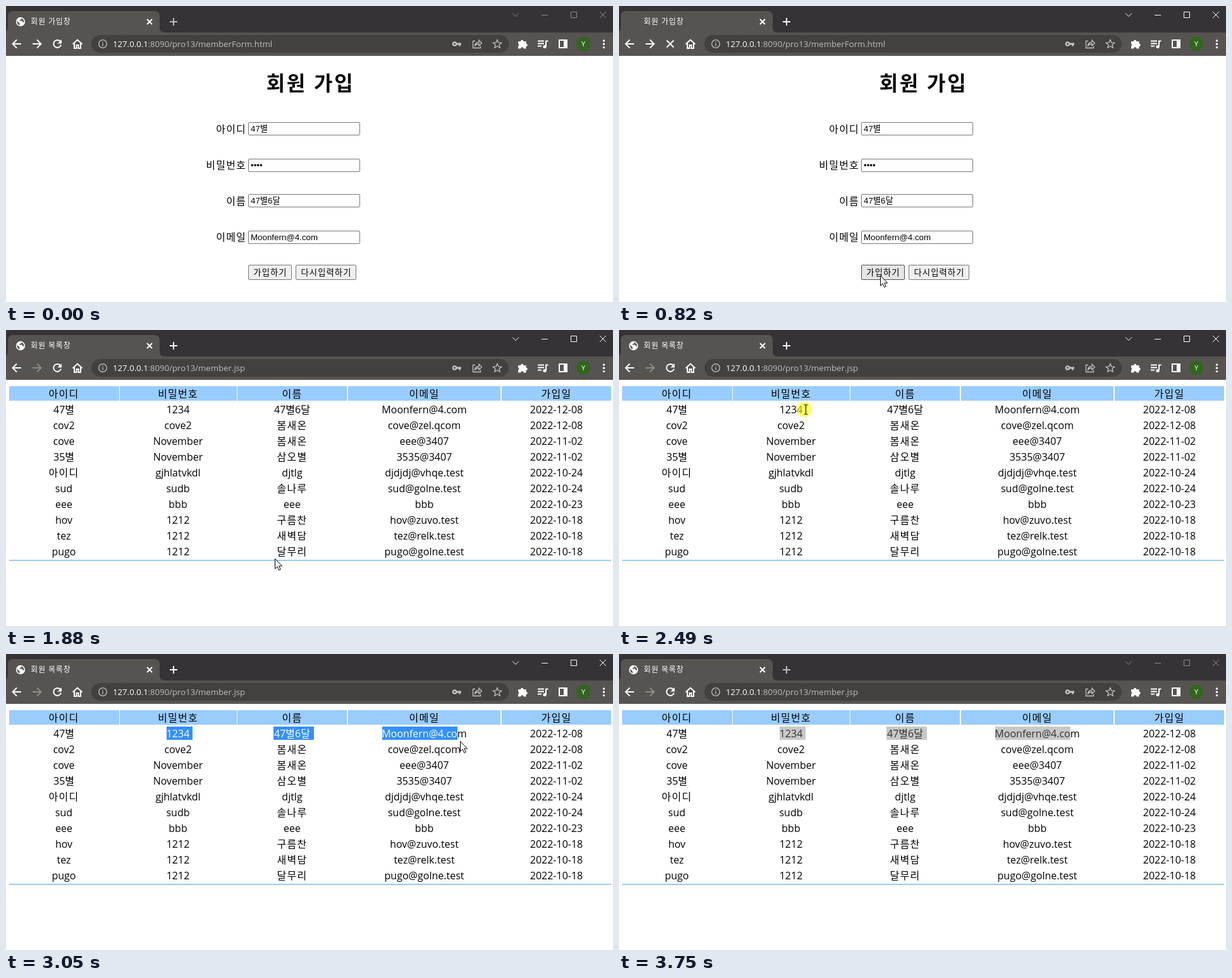
An HTML page that plays this animation: 960x469 px, repeating every 3.95 s.

```html
<!DOCTYPE html>
<html lang="ko">
<head>
<meta charset="utf-8">
<title>회원 가입창</title>
<style>
html, body { margin: 0; width: 100%; height: 100%; overflow: hidden; background: #fff; }
svg { display: block; width: 960px; height: 469px; }
text { font-family: "Open Sans", "Noto Sans CJK KR", "Noto Sans CJK", sans-serif; font-size: 16px; white-space: pre; }
.field { font-family: "Liberation Sans", "Noto Sans CJK KR", "Noto Sans CJK", sans-serif; font-size: 13.33px; }
.mid { text-anchor: middle; }
.end { text-anchor: end; }
.ko { letter-spacing: 1.2px; }
.small { font-size: 13.33px; letter-spacing: 1.1px; }
.tab { font-size: 12px; letter-spacing: .9px; }
.url { font-size: 13.2px; }
.line { fill: none; stroke: #fff; stroke-width: 2; }
.soft { fill: none; stroke: #c4c1bf; stroke-width: 1.3; }
.thin { fill: none; stroke: #fff; stroke-width: 1; }
.away .thin { stroke: #8e8c8c; }
.away .plus { stroke: #c0bebd; }
</style>
</head>
<body>
<svg id="stage" viewBox="0 0 960 469" xmlns="http://www.w3.org/2000/svg">
  <defs><clipPath id="clip"><rect id="reach" x="254" y="115" width="0" height="21"/></clipPath></defs>
  <rect width="960" height="469" fill="#fff"/>

  <g id="chrome">
    <rect width="960" height="42" fill="#353335"/>
    <path d="M-5 42Q3 42 3 34V16Q3 8 11 8H235Q243 8 243 16V34Q243 42 251 42Z" fill="#575351"/>
    <rect y="42" width="960" height="37" fill="#575351"/>
    <rect x="135" y="46" width="660" height="28" rx="14" fill="#43403f"/>

    <g id="globe">
      <circle cx="23" cy="25" r="7.2" fill="#fff"/>
      <path d="M17.5 23.5L21.5 27.5V30.5Q17 29 17.5 23.5ZM24 19.5Q29 21 28.5 26L26.5 25.5L25.5 23.5H21.5V22L24 21.5Z" fill="#575351"/>
    </g>
    <path class="line" stroke-width="1.6" d="M223 21L231 29M231 21L223 29"/>
    <path class="line plus" d="M259 25H271M265 19V31"/>
    <path class="thin" d="M801 11.5L806 16.5L811 11.5M847 14.5H857M893.5 9.5H902.5V18.5H893.5ZM939 9L949 19M949 9L939 19"/>

    <path class="line" d="M24 60H11M17 53.5L10.5 60L17 66.5"/>
    <path class="line" id="forward" d="M42 60H55M49 53.5L55.5 60L49 66.5"/>
    <g id="reload">
      <path class="line" d="M85.8 56A6 6 0 1 0 87 61.5"/>
      <path d="M88 53V59.5H81.5Z" fill="#fff"/>
    </g>
    <path class="line" id="stop" d="M75.5 54.5L86.5 65.5M86.5 54.5L75.5 65.5"/>
    <path class="line" d="M105.5 60.5L113 53.5L120.5 60.5M108 59V67H111.5V62H114.5V67H118V59"/>

    <g class="soft">
      <circle cx="153" cy="60" r="6.3"/>
      <path d="M153 59V63.5M153 56.3V57.8"/>
      <circle cx="709.5" cy="60" r="2.6" stroke-width="2.4"/>
      <path d="M713 60H720M717.5 60V63.5" stroke-width="2.8"/>
      <path d="M742 55.5H738.5V66.5H750.5V63.5M741.5 63Q742 57.5 748 57.5V54L752.5 58.7L748 63V60Q744 60 741.5 63Z"/>
      <path d="M777 53.5L778.9 58L783.7 58.4L780 61.5L781.2 66.2L777 63.7L772.8 66.2L774 61.5L770.3 58.4L775.1 58Z"/>
    </g>

    <path d="M810 56H814A2.2 2.2 0 1 1 818.4 56H822.5V59.5A2.2 2.2 0 1 1 822.5 64V67.5H818.5A2.2 2.2 0 0 0 814 67.5H810V63.5A2.2 2.2 0 0 0 810 59.5Z" fill="#fff"/>
    <path class="line" d="M841 55.5H851M841 59.5H851M841 63.5H847M854 64.5V55.5H857.5"/>
    <circle cx="852" cy="64.5" r="2.6" fill="#fff"/>
    <path class="line" d="M875 54H887V66H875Z"/>
    <rect x="882" y="54" width="5" height="12" fill="#fff"/>
    <circle cx="913" cy="60" r="11.2" fill="#31661f"/>
    <g fill="#fff"><circle cx="945.5" cy="55" r="1.7"/><circle cx="945.5" cy="60.3" r="1.7"/><circle cx="945.5" cy="65.6" r="1.7"/></g>
  </g>

  <g id="form"></g>
  <g id="list"></g>
  <g id="picked" clip-path="url(#clip)"></g>

  <circle id="press" r="12" fill="#ffff00" opacity=".6"/>
  <path id="arrow" d="M.5 .5V16.3L4.1 12.9L6.6 18.6L9.2 17.5L6.8 11.9H11.6Z" fill="#fff" stroke="#000"/>
  <path id="beam" d="M-3 -7.5H-1L0 -6.5L1 -7.5H3M0 -6.5V6.5M-3 7.5H-1L0 6.5L1 7.5H3" fill="none" stroke="#222" stroke-width="1.2"/>
</svg>

<script>
const LOOP = 3950;
const $ = id => document.getElementById(id);

function add(parent, tag, attrs, content = '') {
  const el = document.createElementNS('http://www.w3.org/2000/svg', tag);
  for (const key in attrs) el.setAttribute(key, attrs[key]);
  el.textContent = content;
  parent.append(el);
  return el;
}
const label = (parent, x, y, content, cls = '', fill = '#000') =>
  add(parent, 'text', { x, y, class: cls, fill }, content);
const box = (parent, x, y, width, height, fill, more = {}) =>
  add(parent, 'rect', { x, y, width, height, fill, ...more });
const framed = (parent, x, y, w, h, fill) =>
  box(parent, x + .5, y + .5, w - 1, h - 1, fill, { rx: 1.5, stroke: '#767676' });
const show = (el, on) => { el.style.display = on ? '' : 'none'; };

// Browser texts
const title = label($('chrome'), 39, 29, '', 'tab', '#fff');
label($('chrome'), 169, 65, '127.0.0.1', 'url', '#fff');
const path = label($('chrome'), 224.5, 65, '', 'url', '#c0bdbb');
label($('chrome'), 913, 64, 'Y', 'mid', '#fff').style.fontSize = '11px';

// Sign-up form
const form = $('form');
label(form, 481.5, 134, '회원 가입', 'mid').style.cssText =
  'font-size:32px;font-weight:700;letter-spacing:2.7px';
[
  ['아이디', '47별', 184],
  ['비밀번호', '••••', 242],
  ['이름', '47별6달', 298],
  ['이메일', 'Moonfern@4.com', 356]
].forEach(([name, value, y], i) => {
  label(form, 380, 201 + i * 57, name, 'end ko');
  framed(form, 383, y, 177, 21, '#fff');
  label(form, 387, y + 15, value, 'field');
});
const join = framed(form, 383, 410, 69, 24, '#efefef');
framed(form, 458, 410, 96, 24, '#efefef');
label(form, 418, 427, '가입하기', 'mid small');
label(form, 506.5, 427, '다시입력하기', 'mid small');

// Member list
const list = $('list');
const centers = [91.5, 272, 452.5, 661.5, 870.5];
const bars = [[5, 174], [180, 185], [366, 173], [541, 241], [784, 173]];
const heads = ['아이디', '비밀번호', '이름', '이메일', '가입일'];
const rows = [
  ['47별', '1234', '47별6달', 'Moonfern@4.com', '2022-12-08'],
  ['cov2', 'cove2', '봄새온', 'cove@zel.qcom', '2022-12-08'],
  ['cove', 'November', '봄새온', 'eee@3407', '2022-11-02'],
  ['35별', 'November', '삼오별', '3535@3407', '2022-11-02'],
  ['아이디', 'gjhlatvkdl', 'djtlg', 'djdjdj@vhqe.test', '2022-10-24'],
  ['sud', 'sudb', '솔나루', 'sud@golne.test', '2022-10-24'],
  ['eee', 'bbb', 'eee', 'bbb', '2022-10-23'],
  ['hov', '1212', '구름찬', 'hov@zuvo.test', '2022-10-18'],
  ['tez', '1212', '새벽담', 'tez@relk.test', '2022-10-18'],
  ['pugo', '1212', '달무리', 'pugo@golne.test', '2022-10-18']
];
const cell = (parent, col, y, content, fill) =>
  label(parent, centers[col], y, content, /^[가-힣]+$/.test(content) ? 'mid ko' : 'mid', fill);

bars.forEach(([x, w], col) => {
  box(list, x, 89, w, 23, '#99ccff');
  cell(list, col, 107, heads[col]);
});
rows.forEach((row, i) => row.forEach((content, col) => cell(list, col, 132 + 25 * i, content)));
box(list, 5, 364, 952, 2, '#99ccff');

// Selected part of the first row
const marks = [[254, 41], [423, 64], [595, 119]].map(([x, w]) => box($('picked'), x, 115, w, 21, '#3390ff'));
const markTexts = [1, 2, 3].map(col => cell($('picked'), col, 132, rows[0][col], '#fff'));

// Pointer positions held between steps: [time, x, y]
function glide(t0, t1, count, from, bend, to, ease = u => u) {
  return Array.from({ length: count }, (_, i) => {
    const part = i / (count - 1), u = ease(part), v = 1 - u;
    const at = k => v * v * from[k] + 2 * u * v * bend[k] + u * u * to[k];
    return [t0 + (t1 - t0) * part, at(0), at(1)];
  });
}
const easeOut = u => 1 - (1 - u) ** 1.7;
const track = [
  [0, -50, -50],
  ...glide(70, 540, 8, [491, 458], [448, 448], [413, 427], easeOut),
  ...glide(1880, 2290, 7, [425, 362], [390, 150], [217, 119]),
  ...glide(2490, 2980, 8, [295, 126], [510, 158], [712, 127]),
  ...glide(3050, 3260, 4, [718, 138], [728, 290], [735, 455]),
  [3330, -50, -50]
];

function draw(t) {
  const within = (a, b) => t >= a && t < b;
  const [, x, y] = track.findLast(step => step[0] <= t + .01);
  const listed = t >= 890, loading = within(820, 890);
  const away = t < 690 || t >= 3750;

  show(form, !listed);
  show(list, listed);
  title.textContent = listed ? '회원 목록창' : '회원 가입창';
  path.textContent = ':8090/pro13/' + (listed ? 'member.jsp' : 'memberForm.html');
  $('chrome').setAttribute('class', away ? 'away' : '');
  show($('globe'), !loading);
  show($('reload'), !loading);
  show($('stop'), loading);
  $('forward').style.stroke = listed ? '#908d87' : '#fff';

  const pressed = within(690, 820);
  const hover = x >= 383 && x < 452 && y >= 410 && y < 434;
  join.setAttribute('fill', pressed ? '#f5f5f5' : hover ? '#e5e5e5' : '#efefef');
  join.setAttribute('stroke', pressed ? '#8d8d8d' : hover ? '#4f4f4f' : '#767676');

  const end = t < 2560 ? 254 : t < 2980 ? x : 714;
  $('reach').setAttribute('width', end - 254);
  marks.forEach(m => m.setAttribute('fill', t >= 3750 ? '#c8c8c8' : '#3390ff'));
  markTexts.forEach(m => m.setAttribute('fill', t >= 3750 ? '#323232' : '#fff'));

  const dragging = within(2490, 3050);
  show($('arrow'), !dragging);
  show($('beam'), dragging);
  show($('press'), pressed || within(2360, 3050));
  const rx = Math.round(x), ry = Math.round(y);
  $('arrow').setAttribute('transform', `translate(${rx} ${ry})`);
  $('beam').setAttribute('transform', `translate(${rx + .5} ${ry})`);
  $('press').setAttribute('transform', `translate(${rx - (dragging ? 2 : 0)} ${ry})`);
}

const start = performance.now();
function tick() {
  draw((performance.now() - start) % LOOP);
  requestAnimationFrame(tick);
}
tick();
</script>
</body>
</html>
```
